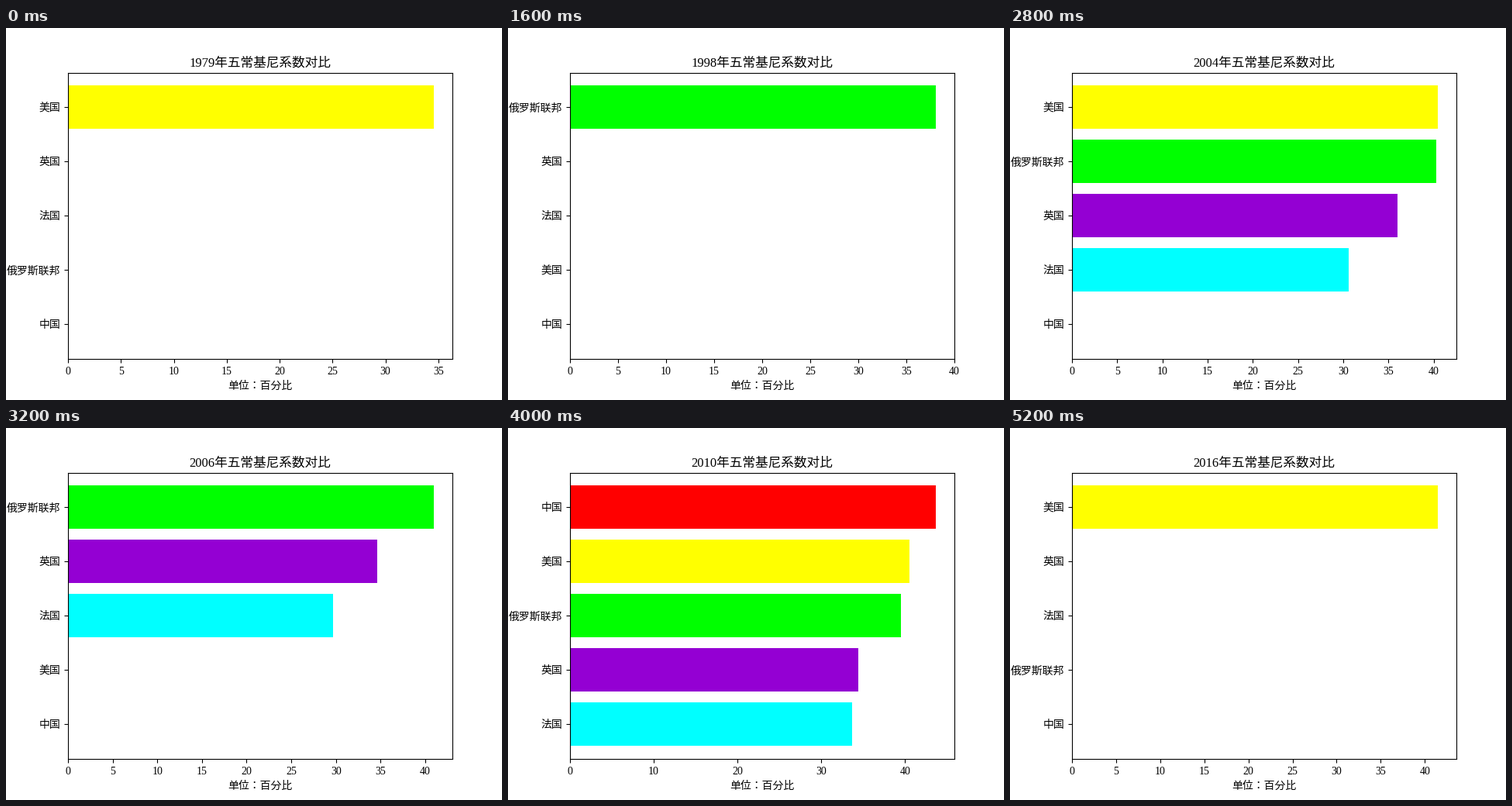
A matplotlib script that plays this animation: 640x480 px, repeating every 5.4 s.

```python
import matplotlib.pyplot as plt
from matplotlib.animation import FuncAnimation

plt.rcParams["font.family"] = ["Liberation Serif", "Noto Sans CJK JP"]
plt.rcParams["font.weight"] = "light"
plt.rcParams["axes.titleweight"] = "light"


def run(start, values, step=1):
    """Map evenly spaced years to values."""
    return {start + i * step: v for i, v in enumerate(values)}


GINI = {
    "中国": run(1990, [32.2])
    | run(1996, [35.2, 38.7, 42.0, 40.9, 43.0], 3)
    | run(2010, [43.7, 42.4, 42.2, 39.7, 39.2, 38.6]),
    "美国": run(1979, [34.6, 37.5], 7)
    | run(1991, [38.2, 40.2, 40.8, 40.4], 3)
    | run(2004, [40.5, 41.1, 40.5, 41.0, 41.5], 3),
    "俄罗斯联邦": run(1993, [48.4])
    | run(1996, [46.1, 38.4, 38.1, 37.4, 37.1, 36.9, 37.3, 40.0, 40.3, 41.3,
                 41.0, 42.3, 41.6, 39.8, 39.5, 39.7, 40.7, 40.9, 39.9, 37.7]),
    "法国": run(2003, [31.4, 30.6, 29.8, 29.7, 32.4, 33.0, 32.7,
                     33.7, 33.3, 33.1, 32.5, 32.3, 32.7]),
    "英国": run(2004, [36.0, 34.3, 34.6, 35.7, 34.1, 34.3,
                     34.4, 33.2, 32.3, 33.2, 34.0, 33.2]),
}
COLORS = {
    "中国": "red",
    "美国": "yellow",
    "俄罗斯联邦": "lime",
    "法国": "cyan",
    "英国": "darkviolet",
}
YEARS = sorted(set().union(*GINI.values()))

fig, ax = plt.subplots(figsize=(6.4, 4.8), dpi=100)


def draw(i):
    year = YEARS[i]
    value = {name: series.get(year, 0) for name, series in GINI.items()}
    names = sorted(GINI, key=value.get)  # stable: missing values keep their order

    ax.clear()
    ax.barh(names, [value[n] for n in names], color=[COLORS[n] for n in names])
    ax.set_title(f"{year}年五常基尼系数对比")
    ax.text(328, 14, "单位：百分比", ha="center", va="baseline", transform=None)
    return []


anim = FuncAnimation(fig, draw, frames=len(YEARS), init_func=lambda: draw(0),
                     interval=200, repeat=True, repeat_delay=0)
plt.show()
```
